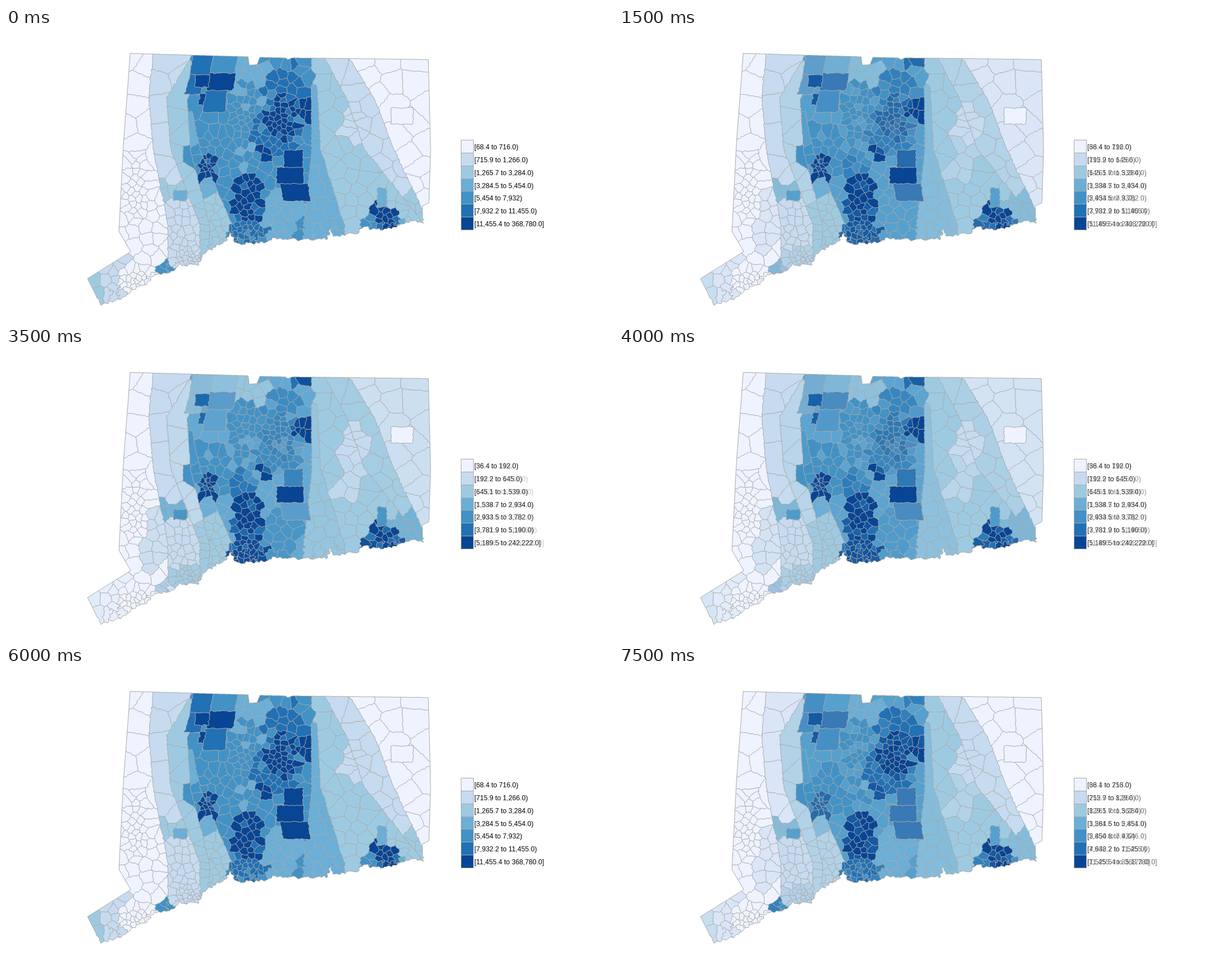
Write a matplotlib script that moves like this. It is 1081 px wide and 518 px high and loops after 8000 ms.

```python
import numpy as np
import matplotlib.pyplot as plt
from matplotlib.animation import FuncAnimation
from matplotlib.patches import Rectangle
from matplotlib.path import Path

W, H, DPI = 1081, 518, 128
LEFT, TOP, MW, MH, SS = 140, 40, 624, 460, 3   # map window and supersampling
STEPS = 6                                      # frames per cross-fade
ORDER = (0, 1, 0, 2)                           # class sets faded through
BLUES = np.array([(239, 243, 255), (198, 219, 239), (158, 202, 225),
                  (107, 174, 214), (66, 146, 198), (33, 113, 181),
                  (8, 69, 148)], float)
LINE = (169, 169, 169)

LABELS = (
    ("[68.4 to 716.0)", "[715.9 to 1,266.0)", "[1,265.7 to 3,284.0)",
     "[3,284.5 to 5,454.0)", "[5,454 to 7,932)", "[7,932.2 to 11,455.0)",
     "[11,455.4 to 368,780.0]"),
    ("[36.4 to 192.0)", "[192.2 to 645.0)", "[645.1 to 1,539.0)",
     "[1,538.7 to 2,934.0)", "[2,933.5 to 3,782.0)", "[3,781.9 to 5,190.0)",
     "[5,189.5 to 242,222.0]"),
    ("[36.1 to 253.0)", "[252.7 to 829.0)", "[829.1 to 1,562.0)",
     "[1,561.6 to 2,851.0)", "[2,850.8 to 4,646.0)", "[4,646.2 to 7,525.0)",
     "[7,525.5 to 35,173.0]"),
)

OUTLINE = (
    (221, 45), (431, 51), (433, 66), (447, 65), (452, 52), (497, 53),
    (502, 56), (510, 53), (752, 56), (756, 218), (753, 311), (741, 317),
    (742, 346), (722, 343), (688, 356), (656, 359), (640, 352), (625, 364),
    (583, 371), (578, 357), (572, 375), (530, 377), (472, 374), (464, 381),
    (420, 384), (405, 382), (402, 364), (385, 384), (353, 399), (342, 421),
    (310, 422), (292, 436), (264, 438), (250, 455), (225, 465), (208, 481),
    (168, 492), (145, 446), (222, 398), (201, 362), (209, 205), (217, 100))

# Strips from west to east: where they end at each height in STRIP_Y, and one
# class digit per data set for the tracts in them.
STRIP_Y = (45, 125, 215, 350)
STRIP_X = ((262, 254, 262, 288), (333, 286, 293, 345), (334, 322, 328, 362),
           (335, 326, 345, 402), (545, 543, 545, 530), (550, 555, 560, 602),
           (563, 606, 638, 745), (605, 656, 690, 755))
STRIP_CODE = ("000", "110", "211", "332", "433", "322", "222", "121", "010")

# Towns: classes, centre, radii and tract spacing; later ones win.
TOWNS = (
    ("323", 436, 78, 30, 32, 18), ("444", 430, 155, 28, 62, 10),
    ("444", 365, 222, 38, 42, 12), ("545", 492, 108, 36, 26, 13),
    ("545", 480, 180, 44, 44, 10), ("646", 490, 160, 28, 40, 8),
    ("666", 524, 147, 18, 11, 9), ("565", 521, 62, 9, 12, 12),
    ("664", 358, 247, 12, 18, 5), ("665", 456, 219, 10, 13, 9),
    ("454", 421, 240, 22, 22, 11), ("343", 486, 340, 36, 52, 16),
    ("666", 430, 308, 25, 45, 9), ("565", 430, 366, 34, 20, 7),
    ("221", 368, 352, 28, 48, 10), ("011", 267, 345, 21, 58, 16),
    ("111", 317, 360, 30, 58, 11), ("122", 322, 408, 24, 18, 6),
    ("000", 230, 285, 20, 60, 9), ("200", 160, 450, 25, 30, 18),
    ("100", 196, 448, 22, 45, 13), ("000", 232, 448, 32, 22, 7),
    ("515", 289, 434, 9, 10, 8), ("233", 288, 285, 24, 12, 13),
    ("111", 620, 168, 14, 30, 10), ("211", 612, 232, 26, 32, 22),
    ("233", 715, 330, 38, 28, 11), ("465", 674, 342, 34, 20, 10),
    ("666", 676, 339, 22, 20, 8))

# Large single tracts: classes, box and slant.
BLOCKS = (
    ("523", 335, 40, 371, 83, -.2), ("423", 371, 40, 415, 80, -.2),
    ("633", 363, 80, 410, 111, -.2), ("523", 328, 83, 356, 118, -.3),
    ("655", 338, 83, 363, 105, -.1), ("533", 354, 111, 394, 150, -.1),
    ("655", 346, 116, 356, 137, -.2), ("643", 495, 217, 529, 248, 0),
    ("663", 482, 248, 530, 277, 0), ("633", 488, 277, 538, 308, .15),
    ("344", 298, 289, 322, 307, 0), ("344", 661, 285, 678, 319, 0),
    ("000", 686, 142, 725, 171, 0))

rng = np.random.default_rng(9)

X, Y = np.meshgrid(LEFT + (np.arange(MW * SS) + .5) / SS,
                   TOP + (np.arange(MH * SS) + .5) / SS)


def waves():
    total = np.zeros_like(X)
    for k, turn, shift in rng.uniform((.15, 0, 0), (.9, 6.3, 6.3), (8, 3)):
        total += np.sin(k * (X * np.cos(turn) + Y * np.sin(turn)) + shift)
    return total / 2.8


# Borders wobble slightly inland and more along the shore.
shore = np.interp(X, (160, 300, 400, 740), (480, 415, 366, 342))
rough = 1.5 * np.clip((Y - shore + 8) / 10, 0, 1)
nx, ny = waves(), waves()
SX, SY = X + rough * nx, Y + rough * ny
WX, WY = SX + .7 * nx, SY + .7 * ny

coast = Path(OUTLINE)
land = coast.contains_points(np.c_[SX.ravel(), SY.ravel()]).reshape(X.shape)


def strip(x, y):
    return sum((x > np.interp(y, STRIP_Y, ends)).astype(int) for ends in STRIP_X)


def scatter(tries=40000):
    """Random tract centres kept apart by the local spacing, with their class."""
    spots = rng.uniform((LEFT, TOP), (LEFT + MW, TOP + MH), (tries, 2))
    x, y = spots[coast.contains_points(spots)].T
    gap = 16 + .075 * np.abs(x - 470) * np.clip((330 - y) / 150, .3, 1)
    code = np.array(STRIP_CODE)[strip(x, y)]
    for name, cx, cy, rx, ry, space in TOWNS:
        near = ((x - cx) / rx) ** 2 + ((y - cy) / ry) ** 2 < 1
        gap[near] = space
        code[near] = name
    kept = []
    for i in range(len(x)):
        if (np.hypot(x[kept] - x[i], y[kept] - y[i]) > gap[i]).all():
            kept.append(i)
    return x[kept], y[kept], gap[kept], code[kept]


def digits(code):
    return [int(c) for c in code]


sx, sy, gap, code = scatter()
classes = np.array([digits(c) for c in code])
busy = (gap < 14) & (classes[:, 0] > 3)
classes[busy] -= rng.random((busy.sum(), 3)) < .15

# Each pixel joins the nearest centre, preferably in its own strip.
label = np.full(X.shape, -1)
best = np.full(X.shape, np.inf)
zone = strip(WX, WY)
for i, (x, y, g, z) in enumerate(zip(sx, sy, gap, strip(sx, sy))):
    reach = 2.5 * g + 22
    win = tuple(slice(max(0, int((c - reach - o) * SS)), int((c + reach - o) * SS))
                for c, o in ((y, TOP), (x, LEFT)))
    d = (WX[win] - x) ** 2 + (WY[win] - y) ** 2 + 4000 * (zone[win] != z)
    closer = d < best[win]
    best[win][closer] = d[closer]
    label[win][closer] = i

for i, (_, x0, y0, x1, y1, slant) in enumerate(BLOCKS):
    bx = WX - slant * (WY - y0)
    label[(bx > x0) & (bx < x1) & (WY > y0) & (WY < y1)] = len(classes) + i
classes = np.vstack([classes, [digits(b[0]) for b in BLOCKS]])

label[~land] = -1

edge = np.zeros(X.shape, bool)
for lab, out in ((label, edge), (label.T, edge.T)):
    change = lab[1:] != lab[:-1]
    out[1:] |= change
    out[:-1] |= change
    out[2:] |= change[:-1]


def paint(which):
    rgb = BLUES[classes[label, which]]
    rgb[label < 0] = 255
    rgb[edge] = LINE
    return rgb.reshape(MH, SS, MW, SS, 3).mean((1, 3)) / 255


maps = [paint(i) for i in range(3)]

fig = plt.figure(figsize=(W / DPI, H / DPI), dpi=DPI, facecolor="white")
ax = fig.add_axes([0, 0, 1, 1])
ax.axis("off")
image = ax.imshow(maps[0], extent=(LEFT, LEFT + MW, TOP + MH, TOP),
                  interpolation="nearest", aspect="auto")
ax.set_xlim(0, W)
ax.set_ylim(H, 0)

ROW = 22.85
for i, color in enumerate(BLUES / 255):
    ax.add_patch(Rectangle((809.5, 199 + i * ROW), 22, ROW, facecolor=color,
                           edgecolor=np.array(LINE) / 255, linewidth=72 / DPI))
texts = [[ax.text(834.5, 216 + i * ROW, s, family="Liberation Sans",
                  size=12.15 * 72 / DPI, color="black", va="baseline")
          for i, s in enumerate(rows)] for rows in LABELS]


def update(frame):
    k, step = divmod(frame, STEPS)
    t = step / STEPS
    weights = [0, 0, 0]
    weights[ORDER[k]] += 1 - t
    weights[ORDER[k + 1]] += t
    image.set_data(np.clip(sum(w * m for w, m in zip(weights, maps)), 0, 1))
    for w, column in zip(weights, texts):
        for text in column:
            text.set_alpha(w ** .8)
            text.set_visible(w > 0)
    return [image]


anim = FuncAnimation(fig, update, frames=16, interval=500, init_func=lambda: update(0),
                     repeat=True, repeat_delay=0, blit=False)
plt.show()
```
